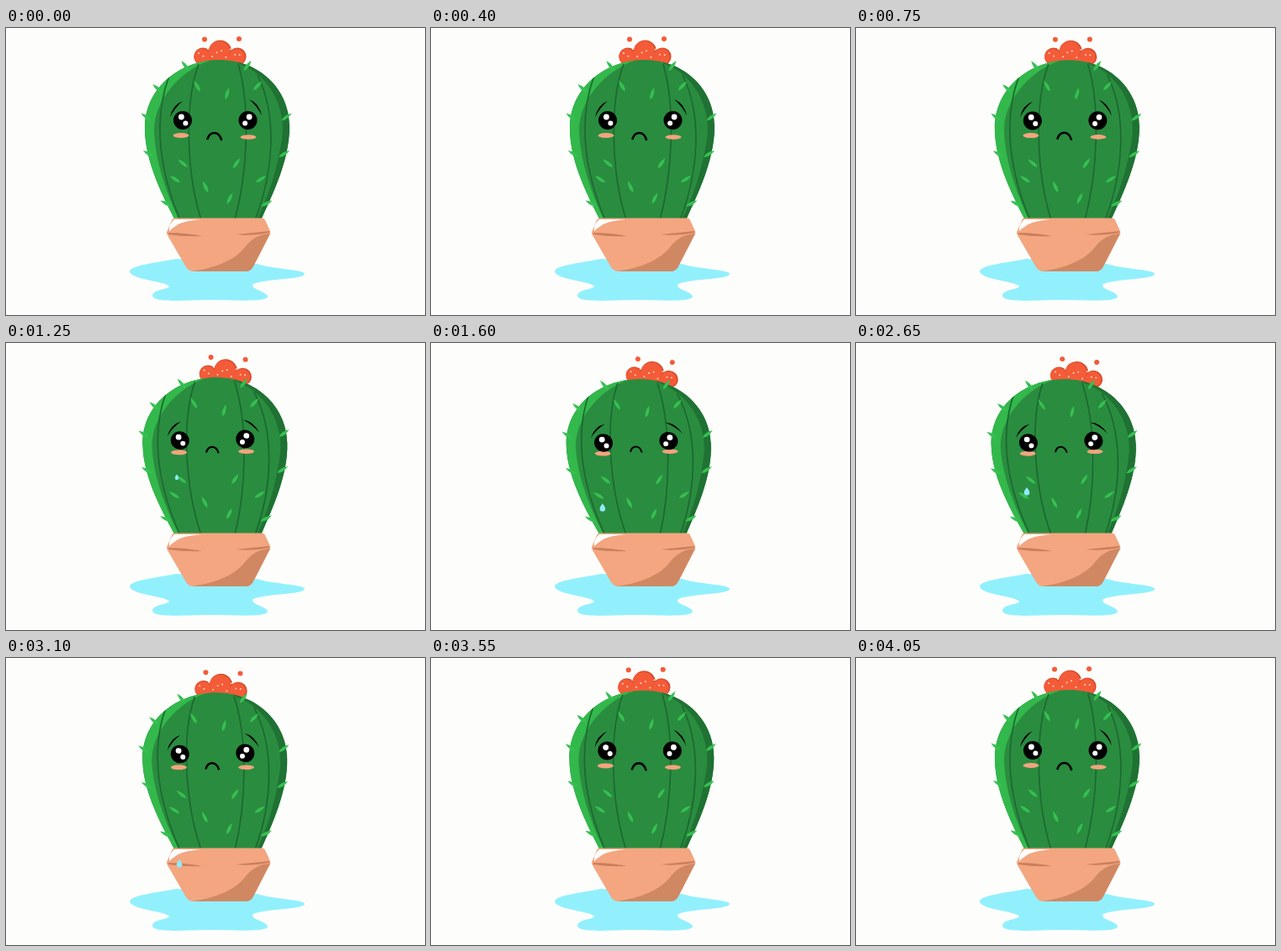
Animation of 498x342 px, one loop 4100 ms. Source, as an HTML page:

```html
<!DOCTYPE html>
<html lang="en">
<head>
<meta charset="utf-8">
<title>Sad cactus</title>
<style>
  html, body { margin: 0; width: 100%; height: 100%; overflow: hidden; background: #fdfefc; }
  svg { display: block; width: 100vw; height: 100vh; }
</style>
</head>
<body>
<svg viewBox="0 0 498 342">
  <defs>
    <path id="shape" d="M201 229C188 203 165 160 165 120C165 70 208 38 254 38C300 38 337 72 337 118C337 158 316 200 303 229Z"/>
    <clipPath id="inside"><use href="#shape"/></clipPath>
    <g id="eye">
      <circle r="11"/>
      <g fill="#fff"><circle cx="-1.6" cy="-4" r="3.4"/><circle cx="3.4" cy="3.6" r="3"/></g>
    </g>
    <path id="brow" d="M-7.5 10Q-4.5-5 7.5-9.5Q-2.5-1-7.5 10Z"/>
    <path id="drop" fill="#8feafa" d="M0-6Q4-1 4 1.5A4 4 0 0 1-4 1.5Q-4-1 0-6Z"/>
  </defs>

  <path fill="#92f0fd" d="M147 290C149 282 180 280 202 275L298 281C315 287 355 288 355 293C354 300 312 298 294 305C288 311 311 314 311 320C310 327 270 324 240 324C214 324 175 328 174 319C175 311 192 312 194 308C192 302 148 300 147 290Z"/>

  <g id="plant">
    <g id="flower" fill="#f45b38"></g>
    <use href="#shape" fill="#2a8c3f"/>
    <g clip-path="url(#inside)">
      <path fill="#33b84b" d="M254 30Q242 40 236 41C206 54 177 85 176 121C177 160 192 200 206 229H150V30Z"/>
      <path fill="#1f7233" d="M268 30L276 42C317 57 333 100 328 132C322 170 312 200 298 229H350V30Z"/>
      <g fill="none" stroke="#1b6a30" stroke-width="1.7">
        <path d="M194 57C174 110 183 172 207 229"/>
        <path d="M229 43C212 88 214 172 232 229"/>
        <path d="M276 43C291 95 287 172 272 229"/>
        <path d="M299 56C323 105 318 172 296 229"/>
      </g>
    </g>
    <g id="spines" fill="#36c052"></g>
    <g fill="#f3a47e">
      <ellipse id="cheekL" rx="9.5" ry="3"/>
      <ellipse id="cheekR" rx="9.5" ry="2.8"/>
    </g>
    <use id="eyeL" href="#eye"/>
    <use id="eyeR" href="#eye"/>
    <use id="browL" href="#brow"/>
    <use id="browR" href="#brow"/>
    <path id="mouth" fill="none" stroke="#000" stroke-width="2.6" stroke-linecap="round" d="M-8 3C-5-6 5-7 8.5 4"/>
  </g>

  <path fill="#f3a680" d="M201 226.6H304Q307 226.6 308 229L314 242Q315 245 313 247L294 284Q291 290 285 290H223Q217 290 214 285L192 247Q190 244 192 241L197 229Q198 226.6 201 226.6Z"/>
  <path fill="#d08863" d="M314 245L294 284Q291 290 285 290H221Q268 283 285 260Q296 246 314 245Z"/>
  <path fill="#fff" d="M194 242Q193 234 200 228H232Q210 230 203 235Q197 239 194 242Z"/>
  <path fill="#c97f5c" d="M193 244Q213 244 233 248Q212 249 193 246Z"/>
  <path fill="#c97f5c" d="M273 246Q293 244 313 242V244Q293 248 273 246Z"/>

  <use class="tear" href="#drop"/>
  <use class="tear" href="#drop"/>
</svg>
<script>
const LOOP = 4100, STEP = 50, MIDDLE = 251, FOOT = 226;
const $ = id => document.getElementById(id);
const tears = document.querySelectorAll('.tear');
const range = n => [...Array(n).keys()];
const dot = (x, y, r, fill = 'inherit') => `<circle cx="${x}" cy="${y}" r="${r}" fill="${fill}"/>`;

// Spines point upwards and lean outwards, more so far from the middle and low down.
function spine(x, y) {
  const angle = 60 * Math.tanh((x - MIDDLE) / 35) * (.7 + y / 500);
  return `<path d="M0 7.5Q-4 2 0-7.5Q4 2 0 7.5Z" transform="translate(${x} ${y}) rotate(${angle})"/>`;
}

// Round dome above, parabola narrowing towards the pot.
function halfWidth(y) {
  return y < 115 ? 84 * Math.sqrt(1 - ((115 - y) / 78) ** 2) : 84 - (y - 115) ** 2 / 365;
}

function growSpines() {
  const rim = [45, 72, 106, 150, 209].flatMap(y =>
    [-1, 1].filter(side => side < 0 || y !== 72).map(side => spine(MIDDLE - 1 + side * halfWidth(y), y)));
  const top = range(3).map(i => spine(227 + 36 * i, 69 + 9 * (i % 2)));
  // Three spines fan out on either side of the middle rib.
  const low = [-1, 1].flatMap(side => [
    spine(252 + side * 51, 180), spine(242 + side * 32, 161), spine(251.5 + side * 14.5, 196 + side * 7)
  ]);
  return [...rim, ...top, ...low].join('');
}

function growFlower() {
  const lumps = range(3).map(i => {
    const x = 234 + 20.5 * i, y = 34 - 6 * (i % 2), r = 10.6 + 3 * (i % 2);
    return dot(x, y, r, '#d14a2c') + dot(x - .8, y + .4, r - .8);
  });
  const specks = range(10).map(i => dot(229 + 5.4 * i, 30 + 5 * Math.sin(2.4 * i), 1, '#ffd9c0'));
  const base = '<path d="M232 34H276L279 44Q255 34 229 45Z"/>';
  return lumps.join('') + base + dot(236, 13.5, 3) + dot(277, 13, 3) + specks.join('');
}

$('spines').innerHTML = growSpines();
$('flower').innerHTML = growFlower();

function ease(t, from, to) {
  const u = Math.min(1, Math.max(0, (t - from) / (to - from)));
  return u * u * (3 - 2 * u);
}

function place(node, x, y, more = '') {
  node.setAttribute('transform', `translate(${x} ${y}) ${more}`);
}

function drawTear(tear, u) {
  const y = 148 + 9.86e-5 * u * u;
  const x = 203 + Math.max(0, y - 177) / 22;
  place(tear, x, y, `scale(${.82 * Math.min(1, Math.max(0, u / 500))})`);
  tear.style.display = u > 60 && y < 290 ? '' : 'none';
}

function draw(t) {
  const lean = ease(t, 650, 1700) - ease(t, 2600, 3850);
  const mood = ease(t, 600, 1620) - ease(t, 2550, 3500);

  // Lean and squash, keeping the foot of the plant in the pot.
  const skew = .04 * lean, tilt = -.01 * lean, squash = .027 * lean;
  $('plant').setAttribute('transform',
    `matrix(1 ${tilt} ${skew} ${1 - squash} ${-FOOT * skew} ${FOOT * squash - MIDDLE * tilt})`);
  place($('flower'), 15 * mood, 2 * mood, `rotate(${7 * mood} 254 39)`);

  place($('eyeL'), 210 - .7 * mood, 110 + 5.7 * mood);
  place($('eyeR'), 287.5 - .7 * mood, 110 + 4 * mood, 'scale(-1 1)');
  place($('browL'), 202.5 + .7 * mood, 96.5 + 4.5 * mood, `rotate(${8 * mood})`);
  place($('browR'), 296.5 - 3 * mood, 94.5 + 3.7 * mood, `rotate(${-18 * mood}) scale(-1 1)`);
  place($('cheekL'), 208, 128 + .7 * mood);
  place($('cheekR'), 288, 130 - 3 * mood);
  place($('mouth'), 247.5, 129 - 5 * mood, `scale(${1 - .2 * mood})`);

  drawTear(tears[0], t - 901);
  drawTear(tears[1], t - 2108);
}

const start = performance.now();
function tick() {
  const t = (performance.now() - start) % LOOP;
  draw(Math.floor(t / STEP) * STEP);
  requestAnimationFrame(tick);
}
tick();
</script>
</body>
</html>
```
